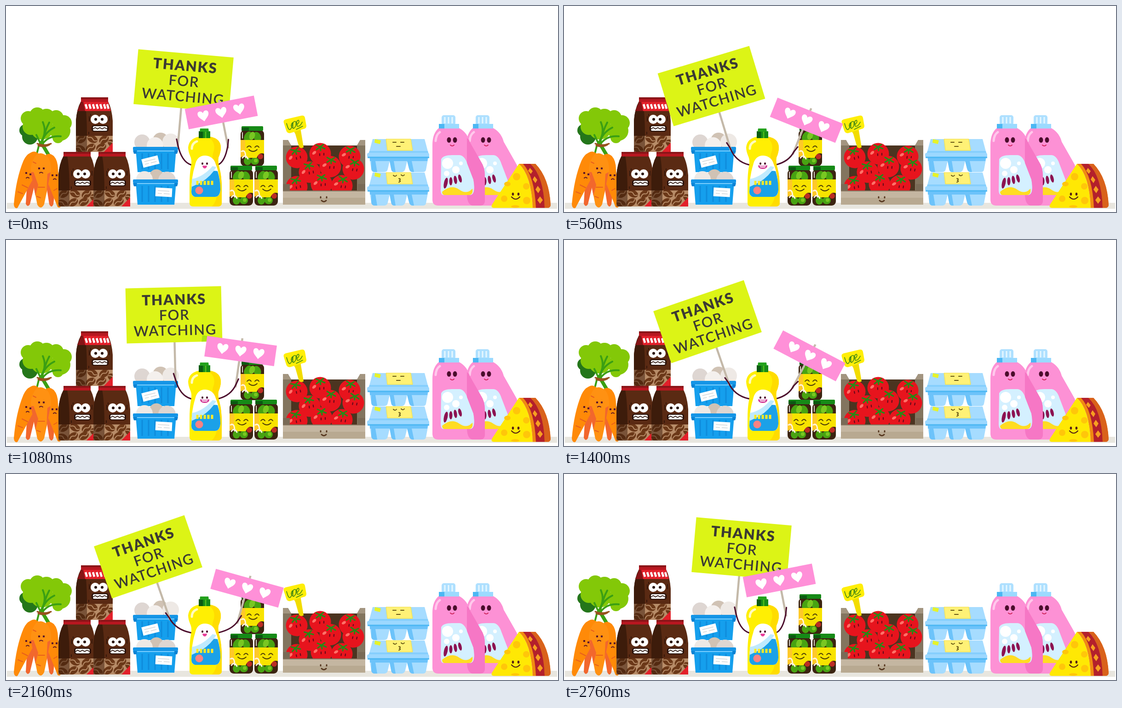
Animation, 1200 px wide and 449 px high, one loop 5 s. Source, as an HTML page:

```html
<!DOCTYPE html>
<html lang="en">
<head>
<meta charset="utf-8">
<title>Thanks for watching</title>
<style>
  html, body { margin: 0; width: 100%; height: 100%; overflow: hidden; background: #fff; }
  svg { display: block; width: 100%; height: 100%; }
  .line { fill: none; stroke-linecap: round; stroke-linejoin: round; }
  .ink { stroke: #4b0d2c; }
  .words { font: 600 31px Lato, "Open Sans", sans-serif; letter-spacing: 1.6px; text-anchor: middle; fill: #3b3a33; }
  .words .heavy { font-weight: 900; letter-spacing: 2px; }
</style>
</head>
<body>
<svg viewBox="0 0 1200 449">
  <defs>
    <g id="bean">
      <ellipse rx="11.5" ry="8" fill="#6b3818"/>
      <path class="line" d="M-10 1Q-3-4 1 0T10-1" stroke="#b78c68" stroke-width="2"/>
    </g>
    <clipPath id="beanArea"><path d="M152 283H232V318H152Z"/></clipPath>
    <g id="bag">
      <path d="M163 208H222Q230 224 232 250V318H152V250Q154 224 163 208Z" fill="#5a2a13"/>
      <path d="M163 208H171Q177 235 176 318H152V250Q154 224 163 208Z" fill="#3d1c0b"/>
      <g clip-path="url(#beanArea)">
        <path d="M152 283H232V318H152Z" fill="#b78c68"/>
        <use href="#bean" transform="translate(164 290) rotate(-35)"/>
        <use href="#bean" transform="translate(188 290) rotate(25)"/>
        <use href="#bean" transform="translate(213 291) rotate(-35)"/>
        <use href="#bean" transform="translate(162 312) rotate(30)"/>
        <use href="#bean" transform="translate(184 309) rotate(-35)"/>
        <use href="#bean" transform="translate(207 308) rotate(-28)"/>
        <use href="#bean" transform="translate(232 300) rotate(30)"/>
        <path d="M152 283H176V318H152Z" fill="#3d1c0b" opacity=".5"/>
      </g>
      <path d="M232 298V318H213Z" fill="#e2202a"/>
      <path class="line" d="M181 241V251M184 236V239M225 241V250M180 275V279" stroke="#35170a" stroke-width="2"/>
      <g fill="#fff"><circle cx="194" cy="247" r="10"/><circle cx="211" cy="247" r="10"/></g>
      <g fill="#2a1209"><circle cx="195" cy="247" r="3"/><circle cx="209" cy="247" r="3"/>
        <rect x="186" y="260" width="37" height="14" rx="5"/></g>
      <rect x="189" y="262" width="31" height="10" rx="3" fill="#fff"/>
      <path class="line" d="M189 268L194 265L199 268L204 265L209 268L214 265L220 268" stroke="#2a1209" stroke-width="1.6"/>
    </g>
    <g id="strip"><path d="M163 199H222V209H163Z" fill="#b81720"/><path d="M163 199H222V203H163Z" fill="#8b1518"/></g>

    <g id="basket">
      <path d="M282 312H370L366 362H286Z" fill="#159fed"/>
      <path d="M296 321V356M310 321V356M324 321V356M338 321V356M352 321V356" stroke="#0f8cdc" stroke-width="3"/>
      <rect x="276" y="307" width="98" height="8" rx="2" fill="#1595e6"/>
      <path d="M276 315H284V322H278ZM366 315H374L372 322H366Z" fill="#0b83d4"/>
      <path d="M285 316H366" stroke="#7cd0ff" stroke-width="2"/>
    </g>
    <g id="tag">
      <rect x="-18" y="-9.5" width="36" height="19" fill="#fff"/>
      <path d="M-13-3H12M-13 3H-4M0 3H13" stroke="#cfd6da" stroke-width="1.5"/>
    </g>

    <g id="jar">
      <rect x="510" y="270" width="51" height="79" rx="9" fill="#3c2411"/>
      <g fill="#48a312"><ellipse cx="526" cy="285" rx="8" ry="12" transform="rotate(25 526 285)"/><ellipse cx="546" cy="285" rx="8" ry="11" transform="rotate(-25 546 285)"/>
        <ellipse cx="525" cy="338" rx="8" ry="9"/><ellipse cx="541" cy="338" rx="9" ry="8"/></g>
      <g fill="#79c722"><ellipse cx="535" cy="283" rx="6" ry="9" transform="rotate(20 535 283)"/><circle cx="543" cy="337" r="4"/></g>
      <circle cx="553" cy="328" r="6" fill="#bb2e24"/>
      <path d="M510 292H561V322Q550 318 545 331H525Q520 321 510 330Z" fill="#f8e300"/>
      <path d="M510 292H520V325L510 330Z" fill="#ffc928"/>
      <path class="line" d="M512 317Q521 312 521 330M514 331Q520 322 526 333" stroke="#fff4dc" stroke-width="3"/>
      <path class="line" d="M524 308Q529 302 533 308M541 308Q546 302 550 308M528 313Q537 321 546 313" stroke="#4a3a08" stroke-width="1.8"/>
      <path class="line" d="M514 276V288" stroke="#fff" stroke-width="2" opacity=".8"/>
      <rect x="512" y="262" width="47" height="10" rx="2" fill="#168a17"/><path d="M512 265H528V272H512Z" fill="#0b5a12"/>
    </g>

    <g id="tomato">
      <circle r="23.5" fill="#e7141d"/>
      <ellipse cx="-13" cy="-2" rx="5" ry="3" fill="#ff7168" transform="rotate(-40 -13 -2)"/>
      <path class="line" d="M0-15L-9-19M0-15L-8-9M0-15L1-7M0-15L10-11M0-15L7-20" stroke="#238c16" stroke-width="3"/>
      <path class="line" d="M-1 0V4M8-1V3" stroke="#66091b" stroke-width="2.2"/>
    </g>

    <g id="carton">
      <path d="M790 330H918L913 357Q912 362 906 362H884Q878 362 876 354L872 338L868 355Q866 362 860 362H844Q838 362 837 354L834 338L830 355Q829 362 822 362H801Q795 362 794 355Z" fill="#a6dcff"/>
      <path d="M791 331H917L916 338H791ZM794 338H803L807 362H801Q795 362 794 355ZM834 338H843L847 362H844Q838 362 837 354ZM872 338H882L887 362H884Q878 362 876 354Z" fill="#6cc3fa"/>
      <path d="M797 290H910L920 328H787Z" fill="#a6dcff"/>
      <path d="M790 316H917L920 328H787Z" fill="#86cffd"/>
      <rect x="785" y="320" width="135" height="10" rx="4" fill="#9cd8ff"/>
      <path d="M786 330H920" stroke="#4cb7f3" stroke-width="3"/>
      <path d="M826 290H880L884 315H829Z" fill="#fff176"/>
      <path d="M826 290H880L884 315H829Z" fill="none" stroke="#f2de45"/>
      <path d="M802 290L815 293L813 301L801 298Z" fill="#e6f22a"/>
    </g>

    <g id="softener">
      <path d="M941 266H985Q1003 276 1008 296L1033 340Q1041 352 1041 370V424Q1041 435 1030 435H940Q927 435 927 422V303Q927 277 941 266Z" fill="#fd91d5"/>
      <path class="line" d="M934 294Q935 280 943 275" stroke="#ffc9ec" stroke-width="5"/>
      <path d="M946 334Q950 325 970 325H986Q997 326 1003 344L1016 378Q1022 411 1009 412H952Q945 412 945 402Z" fill="#d4f0ff"/>
      <path d="M948 405Q968 388 985 400T1014 398Q1016 411 1007 412H953Q948 411 948 405Z" fill="#ffdc22"/>
      <g fill="#fff"><circle cx="960" cy="343" r="12"/><circle cx="978" cy="357" r="8"/><circle cx="958" cy="365" r="6"/><circle cx="989" cy="343" r="4"/></g>
      <g fill="#8c1251"><ellipse cx="956" cy="386" rx="4" ry="12" transform="rotate(12 956 386)"/><ellipse cx="967" cy="382" rx="3.5" ry="9"/><ellipse cx="977" cy="379" rx="3.5" ry="9" transform="rotate(-8 977 379)"/><ellipse cx="987" cy="376" rx="3.5" ry="9" transform="rotate(-14 987 376)"/></g>
      <rect x="947" y="238" width="30" height="22" rx="5" fill="#aee0ff"/>
      <path d="M954 242V256M962 242V256M970 242V256" stroke="#e6f7ff" stroke-width="3"/>
      <rect x="941" y="257" width="44" height="10" fill="#9bdaff"/><path d="M941 257H953V267H941Z" fill="#4cb7f3"/>
      <g fill="#4b0d2c"><ellipse cx="963" cy="292" rx="4.5" ry="6"/><ellipse cx="976" cy="292" rx="4.5" ry="6"/></g>
      <path class="line" d="M966 303Q970 307 974 303" stroke="#d0285f" stroke-width="2"/>
    </g>

    <path id="heart" d="M0 12C-5 6-12 2-12-5C-12-12-3-13 0-6C3-13 12-12 12-5C12 2 5 6 0 12Z" fill="#fff"/>
    <clipPath id="board"><rect id="boardClip" x="-104" y="-60" width="208" height="120"/></clipPath>
  </defs>

  <path d="M2 429H1198V442H2Z" fill="#e8e6df"/>

  <!-- carrots -->
  <g fill="#24761a"><circle cx="42" cy="271" r="13"/><circle cx="52" cy="285" r="17"/></g>
  <g fill="#83c808"><circle cx="48" cy="245" r="16"/><circle cx="68" cy="238" r="17"/><circle cx="88" cy="242" r="18"/><circle cx="54" cy="263" r="18"/><circle cx="78" cy="266" r="25"/><circle cx="109" cy="243" r="16"/><circle cx="126" cy="255" r="17"/><circle cx="118" cy="272" r="22"/><circle cx="113" cy="287" r="12"/></g>
  <path class="line" d="M80 253Q91 278 72 302L65 330M105 265Q81 277 77 302L90 324M94 254Q85 270 78 301M66 281L76 302M119 284Q93 282 80 300L98 330" stroke="#3b9f13" stroke-width="4"/>
  <path d="M48 350H72L52 432Q47 440 43 431ZM82 355H112L103 432Q99 442 94 432Z" fill="#f2672d"/>
  <path d="M53 320Q63 313 73 324L72 352L25 440Q18 443 17 432Q22 375 38 337Q44 324 53 320Z" fill="#ff8a08"/>
  <path d="M82 330Q91 316 104 327Q113 337 113 356L120 431Q119 443 112 438L85 370Z" fill="#ff8a08"/>
  <path d="M60 333Q69 313 88 326Q99 337 98 360L83 432Q76 446 68 433L54 362Q53 345 60 333Z" fill="#ff9112"/>
  <path d="M60 362L70 390L64 414L54 362ZM90 366L88 408L97 362Z" fill="#f2672d"/>
  <path class="line" d="M35 390L47 396M26 405L36 409M70 395H84M67 415L75 418M104 402L111 398M59 340L65 343" stroke="#e85f1c" stroke-width="2"/>
  <path d="M42 364h4M51 367h4M70 354h4M80 354h4M99 369h4M108 369h4" stroke="#5c1628" stroke-width="4"/>
  <path class="line" d="M44 375Q47 372 50 375M73 364Q76 361 80 364M103 378Q106 375 109 378" stroke="#5c1628" stroke-width="2"/>
  <path class="line" d="M68 300Q82 306 98 300M70 304Q84 309 95 302" stroke="#97521d" stroke-width="3"/>

  <!-- coffee -->
  <use href="#bag"/><use href="#strip"/>
  <path d="M163 209H222L228 229H168Z" fill="#e2202a"/><path d="M163 209H168L172 229H155Z" fill="#861416"/>
  <path d="M173 214l3 10M181 214l3 10M189 214l3 10M197 214l3 10M205 214l3 10M213 214l3 10M220 214l3 10" stroke="#fff" stroke-width="4.5"/>
  <g transform="translate(-38 119)"><use href="#bag"/><use href="#strip"/></g>
  <g transform="translate(38 119)"><use href="#bag"/><use href="#strip"/></g>

  <!-- mushrooms -->
  <g><circle cx="336" cy="293" r="17" fill="#d0c2b4"/><circle cx="296" cy="297" r="17" fill="#ded6d2"/><circle cx="358" cy="296" r="18" fill="#eee9e5"/><circle cx="324" cy="304" r="18" fill="#f4f0ed"/></g>
  <use href="#basket"/><use href="#tag" transform="translate(314 339) rotate(-14)"/>
  <g><circle cx="327" cy="372" r="16" fill="#d0c2b4"/><circle cx="301" cy="378" r="18" fill="#eee9e5"/><circle cx="350" cy="380" r="19" fill="#ded6d2"/></g>
  <use href="#basket" y="71"/><use href="#tag" transform="translate(343 406) rotate(3)"/>

  <!-- pickles -->
  <use href="#jar"/><use href="#jar" x="-24" y="86"/><use href="#jar" x="30" y="86"/>

  <!-- crate -->
  <path d="M604 304H779V402H604Z" fill="#4b3420"/>
  <path d="M602 292H613L620 304V403H602ZM781 292H770L763 304V403H781Z" fill="#83755f"/>
  <path d="M602 292H613L620 304H602ZM781 292H770L763 304H781Z" fill="#a39580"/>
  <use href="#tomato" transform="translate(683 322)"/><use href="#tomato" transform="translate(747 328) rotate(8)"/>
  <use href="#tomato" transform="translate(632 330) rotate(-12)"/><use href="#tomato" transform="translate(705 350) rotate(6)"/>
  <use href="#tomato" transform="translate(755 355) rotate(12)"/><use href="#tomato" transform="translate(660 362) rotate(-8)"/>
  <use href="#tomato" transform="translate(632 394) rotate(-10)"/><use href="#tomato" transform="translate(730 392) rotate(10)"/>
  <use href="#tomato" transform="translate(686 388)"/>
  <path d="M602 388H617V403H602ZM765 388H781V403H765Z" fill="#796a56"/>
  <path d="M602 402H781V433H602Z" fill="#c4b6a1"/><path d="M602 418H781V433H602Z" fill="#b8a991"/>
  <path d="M602 403H781" stroke="#85745f" stroke-width="2"/>
  <path class="line" d="M684 416v2M697 416v2M686 424Q691 429 696 424" stroke="#56371f" stroke-width="3"/>
  <path d="M624 270L640 266L647 308Q641 312 637 307L629 279Z" fill="#f2dc00"/>
  <path d="M604 255Q602 249 608 247L642 239Q649 238 650 244L653 261Q653 267 647 268L618 277Q611 278 609 271Z" fill="#ffee08"/>
  <path class="line" d="M610 256Q614 272 618 269T623 254Q616 262 625 267Q632 263 630 252Q622 249 624 265M632 259Q639 253 636 249Q630 249 633 262Q639 264 644 253M631 269L645 262" stroke="#438913" stroke-width="1.6"/>

  <!-- eggs -->
  <use href="#carton"/>
  <path class="line" d="M841 297H848M858 297H865M849 306H857" stroke="#675715" stroke-width="2"/>
  <use href="#carton" y="73"/>
  <path class="line" d="M842 369Q846 373 849 369M859 368Q863 372 866 368M854 376Q860 377 855 380Q860 382 854 384" stroke="#675715" stroke-width="2"/>

  <!-- softener, with the part where the two bottles overlap -->
  <use href="#softener" x="74"/><use href="#softener"/>
  <path d="M1002 288Q1006 290 1008 296L1033 340Q1041 352 1041 370V424Q1041 435 1030 435H1015Q1003 434 1002 412H1009Q1022 411 1016 378L1002 342Z" fill="#f677c5"/>

  <!-- cheese -->
  <path d="M1115 344Q1142 369 1145 440H1060Q1053 439 1057 432Z" fill="#ffe804"/>
  <g fill="#ffc60a"><circle cx="1110" cy="372" r="8"/><ellipse cx="1090" cy="388" rx="7" ry="5"/><circle cx="1131" cy="393" r="7"/><circle cx="1083" cy="420" r="7"/><circle cx="1132" cy="424" r="8"/><ellipse cx="1107" cy="437" rx="9" ry="3"/></g>
  <path d="M1115 344H1151Q1181 375 1184 434Q1183 440 1177 440H1145Q1142 369 1115 344Z" fill="#f08a12"/>
  <path d="M1140 344H1151Q1181 375 1184 434Q1183 440 1177 440H1171Q1169 371 1140 344Z" fill="#d9621b"/>
  <path d="M1124 344H1140Q1169 371 1171 440H1152Q1149 371 1124 344Z" fill="#b3202c"/>
  <path d="M1139 353l6 7-4 6-6-7ZM1149 371l6 8-4 7-6-8ZM1156 392l6 8-5 8-6-8ZM1161 415l6 8-6 8-6-8Z" fill="#f7a021"/>
  <g class="line" stroke="#552116"><path d="M1102 409v2M1114 409v2" stroke-width="4.5"/><path d="M1099 416Q1108 426 1117 416" stroke-width="2.2"/></g>

  <!-- signs -->
  <g id="big">
    <path d="M0 50V146" stroke="#c4b9a9" stroke-width="4.5"/>
    <rect x="-104" y="-60" width="208" height="120" fill="#dcf416"/>
    <g class="words"><text class="heavy" x="1" y="-22">THANKS</text><text x="1" y="11.5">FOR</text><text x="2" y="45">WATCHING</text></g>
  </g>
  <g clip-path="url(#board)"><rect id="shade" x="-87" y="-22.5" width="153" height="45" fill="#9fe012" opacity=".8"/></g>
  <g id="small">
    <path d="M0-28V80" stroke="#c4b9a9" stroke-width="4.5"/>
    <rect x="-76.5" y="-22.5" width="153" height="45" fill="#ff90d8"/>
    <use href="#heart" x="-39.5"/><use href="#heart"/><use href="#heart" x="39.5"/>
  </g>
  <path id="armL" class="line ink" stroke-width="3"/><path id="armR" class="line ink" stroke-width="3"/>

  <!-- yellow bottle -->
  <path d="M419 285H444Q467 289 467 309Q467 319 462 330Q460 339 464 353Q469 371 469 398V429Q469 437 460 437H407Q399 437 399 429V390Q399 366 402 350Q405 336 400 326Q396 316 396 308Q398 289 419 285Z" fill="#ffef03"/>
  <path d="M444 285Q467 289 467 309Q467 319 462 330Q460 339 464 353Q469 371 469 398V429Q469 437 460 437H447Q461 425 459 393Q458 360 451 342Q446 330 452 315Q456 295 438 285Z" fill="#ffdc00"/>
  <path class="line" d="M404 311Q404 299 415 295" stroke="#fffbc0" stroke-width="5"/>
  <path d="M411 347Q415 326 433 326Q451 327 456 345Q464 363 466 399Q466 415 455 416H411Q403 415 403 405Q403 372 411 347Z" fill="#fff"/>
  <path d="M404 389Q420 382 438 365Q450 357 460 360Q466 380 466 400Q465 415 455 416H411Q403 414 403 405Z" fill="#1ba1e8"/>
  <path d="M404 377Q428 373 449 349L457 351Q447 370 425 384L404 394Z" fill="#bfeafe"/>
  <path d="M416 381v9M424 381v9M432 381v9M440 381v9M448 381v9" stroke="#ffe928" stroke-width="5"/>
  <circle cx="420" cy="402" r="8.5" fill="#f98282"/>
  <path d="M419 273H444V288H419Z" fill="#168a17"/><path d="M419 273H428V288H419Z" fill="#0b5a12"/>
  <path d="M422 267H440L441 274H421Z" fill="#23a11c"/><path d="M434 274V288" stroke="#4dbb1a" stroke-width="3"/>
  <path class="line ink" d="M427 343v1M437 343v1" stroke-width="4"/>
  <path id="calm" d="M427 348H437Q436 354 432 354Q428 354 427 348Z" fill="#e83e9a"/>
  <g id="glad"><path d="M422 347Q432 350 442 347Q442 355 432 355Q422 355 422 347Z" fill="#d02f91"/><path d="M425 349Q432 351 439 349L437 352H427Z" fill="#fff"/></g>
</svg>
<script>
const LOOP = 5000, MOVE = 2760, STEP = 40;
const $ = id => document.getElementById(id);

// rows: time, angle, centre x, centre y
const bigKeys = [
  [0, 5, 386, 163], [560, -16.8, 320.5, 174.5], [600, -17, 319.5, 175],
  [930, 10.5, 408, 156], [1080, -1.4, 365, 163], [1360, -19.6, 310, 179],
  [1400, -19, 312, 178], [1740, 10.5, 408, 156], [1800, 9.1, 403, 157],
  [2160, -19.1, 309, 180.5], [2200, -19.4, 308, 181], [MOVE, 5, 386, 163]
];
const smallKeys = [
  [0, -11, 468, 232], [500, 25, 530.5, 251], [560, 21.7, 527, 249],
  [900, -9, 475, 233], [1080, 8, 510, 242], [1400, 27.7, 533.5, 252.5],
  [1430, 28.2, 534, 253], [1800, -4.6, 492, 236], [1830, -5, 491, 236],
  [2160, 15.5, 524, 249], [2220, 16, 525, 249], [MOVE, -11, 468, 232]
];

// smooth interpolation that rests at every turning point
function pose(keys, t) {
  const i = Math.max(0, keys.findIndex(k => k[0] >= t) - 1);
  const slope = (j, c) => (keys[j + 1][c] - keys[j][c]) / (keys[j + 1][0] - keys[j][0]);
  const tangent = (j, c) => {
    if (j === 0 || j === keys.length - 1) return 0;
    const a = slope(j - 1, c), b = slope(j, c);
    return a * b <= 0 ? 0 : 2 * a * b / (a + b);
  };
  const span = keys[i + 1][0] - keys[i][0], u = (t - keys[i][0]) / span;
  const [a, x, y] = [1, 2, 3].map(c => {
    const p = keys[i][c], q = keys[i + 1][c];
    return p + (q - p) * u * u * (3 - 2 * u)
      + span * u * (1 - u) * ((1 - u) * tangent(i, c) - u * tangent(i + 1, c));
  });
  return { a, x, y };
}

function place(p, ...ids) {
  for (const id of ids) $(id).setAttribute("transform", `translate(${p.x} ${p.y}) rotate(${p.a})`);
}

// bends an arm from the shoulder at sx to the grip on a stick
function reach(id, p, grip, sx, side) {
  const r = p.a * Math.PI / 180, sy = 346;
  const point = (x, y) => [p.x + x * Math.cos(r) - y * Math.sin(r), p.y + x * Math.sin(r) + y * Math.cos(r)];
  const [hx, hy] = point(0, grip), tip = point(4 * side, grip - 13);
  $(id).setAttribute("d", `M${sx} ${sy}Q${hx + (sx - hx) * 0.28} ${sy - 7} ${hx} ${hy}L${tip}`);
}

const start = performance.now();
function draw(now) {
  const time = Math.max(0, now - start) % LOOP;
  const t = Math.min(MOVE, Math.floor(time / STEP) * STEP);
  const big = pose(bigKeys, t), small = pose(smallKeys, t);
  place(big, "big", "boardClip");
  place(small, "small", "shade");
  reach("armL", big, 141, 402, -1);
  reach("armR", small, 74, 461, 1);
  const glad = t >= 280 && t < 2000;
  $("glad").style.display = glad ? "" : "none";
  $("calm").style.display = glad ? "none" : "";
  requestAnimationFrame(draw);
}
draw(start);
</script>
</body>
</html>
```
